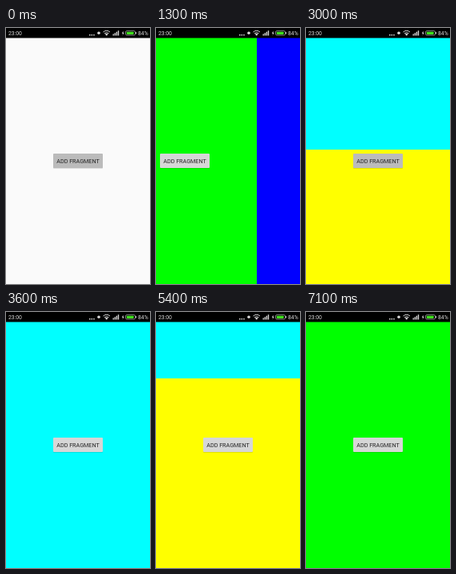
These frames come from a looping animation (180 by 320 pixels, 8000 ms). An HTML page:

```html
<!DOCTYPE html>
<html lang="en">
<head>
<meta charset="utf-8">
<style>
  html, body { margin: 0; width: 100%; height: 100%; overflow: hidden; background: #000; }
  svg { display: block; width: 100vw; height: 100vh; }
  text { font-family: Roboto, sans-serif; }
</style>
</head>
<body>
<svg viewBox="0 0 180 320">
  <g id="pages"></g>
  <g id="status" fill="#d8d8d8">
    <rect width="180" height="12.5" fill="#000"/>
    <text x="3" y="9" font-size="6.8">23:00</text>
    <path d="M104 8h1.5v1.4h-1.5zM106.6 8h1.5v1.4h-1.5zM109.2 8h1.5v1.4h-1.5z"/>
    <circle cx="116" cy="6.3" r="1.8"/>
    <g fill="none" stroke="#d8d8d8" stroke-width="1">
      <path d="M121.5 5Q125.7 1.6 130 5M123 6.8Q125.7 4.6 128.5 6.8"/>
    </g>
    <path d="M123.8 7.7Q125.7 6.4 127.7 7.7L125.7 9.8z"/>
    <path d="M133.5 7.5h1.4v2h-1.4zM135.6 6.2h1.4v3.3h-1.4zM137.7 4.8h1.4v4.7h-1.4zM139.8 3.2h1.4v6.3h-1.4z"/>
    <path d="M146.6 3.4L144.8 6.8h1.3L145.6 9.4L147.6 5.8h-1.3z"/>
    <rect x="149.5" y="3.6" width="12" height="5.4" rx="1.6" fill="none" stroke="#bbb" stroke-width=".7"/>
    <rect x="150.7" y="4.7" width="9" height="3.2" rx=".8" fill="#3ee01c"/>
    <rect x="162" y="5.2" width="1" height="2.2"/>
    <text x="165" y="9" font-size="6.8" textLength="">84%</text>
  </g>
</svg>
<script>
const LOOP = 8000, STEP = 100, TOP = 12, W = 180, H = 308;

// from: side the page slides in from; enter/exit: [first visible step, start, duration];
// press: when its button is held down
const pages = [
  { color: '#fafafa', from: [0, 0], press: 0 },
  { color: '#0000ff', from: [1, 0], enter: [100, -60, 660], press: 900 },
  { color: '#00ff00', from: [-1, 0], enter: [900, 938, 800], press: 1700 },
  { color: '#ffff00', from: [0, 1], enter: [1800, 1694, 800], exit: [6400, 6266, 800], press: 2900 },
  { color: '#00ffff', from: [0, -1], enter: [2900, 2790, 800], exit: [5000, 4984, 800] },
];

const svgNode = (parent, tag, attrs) => {
  const node = document.createElementNS('http://www.w3.org/2000/svg', tag);
  for (const name in attrs) node.setAttribute(name, attrs[name]);
  return parent.appendChild(node);
};

for (const page of pages) {
  page.node = svgNode(document.getElementById('pages'), 'g', {});
  svgNode(page.node, 'rect', { y: TOP, width: W, height: H, fill: page.color });
  svgNode(page.node, 'rect', { x: 59, y: 157.8, width: 62, height: 18, rx: 1, fill: '#000', opacity: 0.15 });
  page.button = svgNode(page.node, 'rect', { x: 59, y: 157, width: 62, height: 18, rx: 1 });
  svgNode(page.node, 'text', { x: 90, y: 169, 'font-size': 7.2, 'text-anchor': 'middle', fill: '#222' })
    .textContent = 'ADD FRAGMENT';
}

function decelerate(time, [visible, start, duration]) {
  if (time < visible) return 0;
  const t = Math.min(1, Math.max(0, (time - start) / duration));
  return 1 - (1 - t) ** 2;
}

function draw(now) {
  const time = Math.floor((now % LOOP) / STEP) * STEP;
  for (const { node, button, from, enter, exit, press } of pages) {
    const entered = enter ? decelerate(time, enter) : 1;
    const exited = exit ? decelerate(time, exit) : 0;
    const away = 1 - entered + exited;
    const x = Math.round(from[0] * W * away), y = Math.round(from[1] * H * away);
    node.setAttribute('transform', `translate(${x} ${y})`);
    const pressed = time >= press && time < press + 200;
    button.setAttribute('fill', pressed ? '#bbbbbb' : '#d6d7d7');
  }
}

const origin = performance.now();
(function tick() {
  draw(performance.now() - origin);
  requestAnimationFrame(tick);
})();
</script>
</body>
</html>
```
